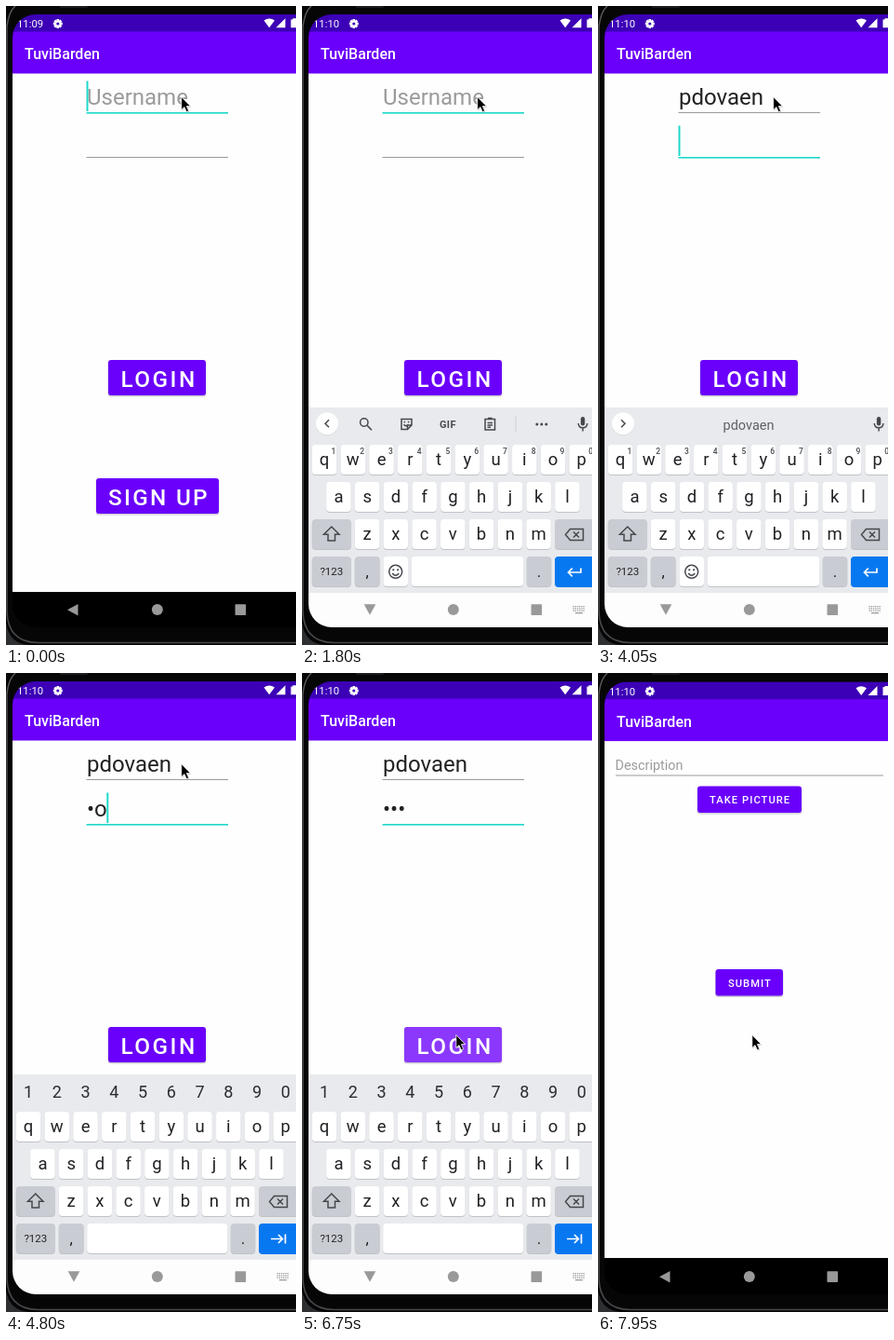
Recreate the animation shown at these times as an HTML page. Size 312 by 686 pixels, loop 8 s.

```html
<!DOCTYPE html>
<html lang="en">
<head>
<meta charset="utf-8">
<title>Login</title>
<style>
  html, body { margin: 0; width: 100%; height: 100%; overflow: hidden; background: #080809; }
  svg { display: block; width: 100%; height: 100%; }
  text { font-family: Roboto, sans-serif; white-space: pre; }
  .mid { text-anchor: middle; }
  .bold { font-weight: 500; }
  .line { fill: none; stroke: #45484d; stroke-width: 1.5; }
</style>
</head>
<body>
<svg id="stage" viewBox="0 0 312 686"></svg>
<script>
const LOOP = 8000, TICK = 150;
const PURPLE = '#6a00fb', TEAL = '#1cd9c9', HINT = '#9b9b9b', INK = '#45484d', BLUE = '#0878f0';
const NAME = 'pdovaen';

const rect = (x, y, w, h, fill, extra = '') =>
  `<rect x="${x}" y="${y}" width="${w}" height="${h}" fill="${fill}" ${extra}/>`;
const text = (x, y, size, fill, str, extra = '') =>
  `<text x="${x}" y="${y}" font-size="${size}" fill="${fill}" ${extra}>${str}</text>`;
const path = (d, extra = 'class="line"') => `<path d="${d}" ${extra}/>`;
const circle = (x, y, r, extra) => `<circle cx="${x}" cy="${y}" r="${r}" ${extra}/>`;
const group = (id, inner, extra = '') => `<g id="${id}" ${extra}>${inner}</g>`;

function button(x, y, w, h, label, tx, ty, size, spacing) {
  return rect(x - .4, y + 1.4, w + .8, h, '#cfcfd5', 'rx="3"') + rect(x, y, w, h, PURPLE, 'rx="3"') +
    text(tx, ty, size, '#fff', label, `class="bold" letter-spacing="${spacing}"`);
}

function key(x, y, w, fill = '#fff', label = '', size = 18.5, shadow = '#bfc2c7') {
  return rect(x, y + 1, w, 32, shadow, 'rx="4"') + rect(x, y, w, 32, fill, 'rx="4"') +
    text(x + w / 2, y + 16 + size * .33, size, '#202124', label, 'class="mid"');
}

const keyRow = (letters, x, y) =>
  [...letters].map((c, i) => key(x + i * 30.75, y, 26.5, '#fff', c)).join('');
const digitRow = (y, dx, size, fill, cls = 'mid') =>
  [...'1234567890'].map((c, i) => text(24 + dx + i * 30.75, y, size, fill, c, `class="${cls}"`)).join('');

function bars() {
  const gear = [0, 1, 2, 3].map(i =>
    `<rect x="-1.3" y="-5" width="2.6" height="10" transform="rotate(${i * 45})"/>`).join('');
  return rect(7, 9, 305, 19, '#3c00b6') + rect(7, 27.5, 305, 45, PURPLE) +
    text(12, 23, 11.3, '#fff', '', 'id="clock"') +
    `<g transform="translate(55.8 19)" fill="#fff">${gear}${circle(0, 0, 3.7, '')}${circle(0, 0, 1.6, 'fill="#3c00b6"')}</g>` +
    path('M277.5 15.6Q283.2 11.5 289 15.6L283.2 23.3Z M300.5 13.3V23.3H290.5Z M306.5 14.5H308.5V13.3H312V23.3H306.5Z', 'fill="#fff"') +
    text(20, 57, 16, '#fff', 'TuviBarden', 'class="bold"');
}

function login() {
  return rect(7, 72, 305, 560, '#fefefe') +
    text(87, 106, 24, HINT, '', 'id="user"') + rect(87, 108.3, 0, 1.3, '#222', 'id="compose"') +
    text(87, 154, 24, '#222', '', 'id="pass"') +
    rect(86.5, 114, 152.5, 1, HINT, 'id="userLine"') + rect(86.5, 162, 152.5, 1, HINT, 'id="passLine"') +
    rect(0, 0, 2, 32.5, TEAL, 'id="caret"') +
    button(110, 380, 105, 38, 'LOGIN', 123.4, 409, 24.3, 2.5) +
    rect(110, 380, 105, 38, '#fff', 'id="ripple" rx="3"') +
    button(97, 507, 132, 38, 'SIGN UP', 110, 536, 24.3, 2.3);
}

function post() {
  return rect(7, 72, 305, 556, '#fefefe') + text(18.5, 104, 14.4, HINT, 'Description') +
    rect(19, 109.5, 288, 1, HINT) +
    button(107, 121.5, 112, 28.5, 'TAKE PICTURE', 120.1, 140, 11.2, 1.04) +
    button(126.5, 318, 72.5, 28.5, 'SUBMIT', 139.9, 336.5, 11.2, 1.04);
}

function nav() {
  let dots = '';
  for (let r = 0; r < 3; r++)
    for (let c = 0; c < 6; c++) dots += rect(291.5 + c * 2.2, 644 + r * 2.3, 1.3, 1.3, '#999');
  return rect(7, 629, 305, 39, '#000', 'id="navBack"') +
    path('M66 648.3L77.5 642V654.6Z', 'id="back" fill="#999"') +
    circle(162.8, 648, 6, 'fill="#999"') + rect(246.5, 642.3, 11.6, 11.8, '#999', 'rx=".8"') +
    group('imeIcon', dots + rect(294, 651, 8, 1.3, '#999'));
}

function tools() {
  return path('M70.2 450.4L75 455.2') + circle(66.8, 447, 4.2, 'class="line"') +
    path('M107 443.5H118V450L113.5 454.5H107ZM118 450H113.5V454.5M109.5 449.3Q111.5 452 114.5 449.3') +
    circle(110.3, 446.6, .9, `fill="${INK}"`) + circle(114.6, 446.6, .9, `fill="${INK}"`) +
    text(157, 452.5, 11, INK, 'GIF', 'class="mid" font-weight="700" letter-spacing=".5"') +
    path('M197 443.5H207.5V455H197ZM199.5 447.5H205M199.5 450H205M199.5 452.3H203M200 442.5H204.5') +
    rect(229.5, 440, 1, 18, '#cdd0d4') +
    [252.8, 257.8, 262.8].map(x => circle(x, 449, 1.5, `fill="${INK}"`)).join('');
}

function keyboard() {
  const grey = '#c9ccd2', word = (id, x) => text(x, 454.5, 14.5, '#5c6066', '', `id="${id}" class="mid"`);
  return rect(7, 431, 305, 199, '#e8eaed') +
    group('strip',
      circle(27, 449, 12, 'fill="#d3d5d9"') + circle(27, 448.3, 12, 'fill="#fff"') +
      path('M29 444.3L25 448.3L29 452.3', 'id="chevron" class="line"') +
      group('tools', tools()) +
      group('words', word('w0', 77) + word('w1', 162) + word('w2', 247) +
        group('dividers', rect(116.5, 439, 1, 19, '#c6c9cd') + rect(207.5, 439, 1, 19, '#c6c9cd'))) +
      rect(299.9, 441, 4.4, 9.5, INK, 'rx="2.2"') +
      path('M297.3 448Q297.5 452.8 302.1 452.8T306.9 448M302.1 453V456.5')) +
    group('digits', digitRow(456, 0, 18, '#2a2c30')) +
    keyRow('qwertyuiop', 10.8, 471) + group('supers', digitRow(480.5, 9.8, 8.5, '#45484d', 'mid bold')) +
    keyRow('asdfghjkl', 26.2, 511) +
    key(10.8, 551, 42, grey) + path('M31.8 559L40 567.3H35.5V574H28V567.3H23.5Z') +
    keyRow('zxcvbnm', 56.8, 551) +
    key(272, 551, 50, grey) + path('M283.5 567.5L288.5 561.5H302.5V573.5H288.5ZM292 564.5L298 570.5M298 564.5L292 570.5') +
    key(10.8, 591, 42, grey, '?123', 11.5) + key(56.8, 591, 26.8, grey, ',', 17) +
    group('emoji', key(87.5, 591, 26.5) + circle(100.7, 607.3, 7, 'class="line"') +
      path('M97.2 609Q100.7 613.5 104.2 609') + circle(98.3, 605.3, 1.1, `fill="${INK}"`) + circle(103.1, 605.3, 1.1, `fill="${INK}"`) +
      key(117.7, 591, 120.5)) +
    group('wideSpace', key(87.2, 591, 151)) +
    key(241.7, 591, 26.5, grey, '.', 17) + key(272, 591, 50, BLUE, '', 0, BLUE) +
    path('', 'id="enter" fill="none" stroke="#fff" stroke-width="1.7"');
}

function body() {
  return rect(0, 0, 312, 686, '#060607') +
    path('M1 22V650Q2 683 34 683.5H312', 'fill="none" stroke="#48494c" stroke-width="1.6"') +
    path('M0 662Q3 684 24 686H0Z', 'fill="#2e2f31"') +
    path('M1 22Q3 6 10 0', 'fill="none" stroke="#5a5b5e" stroke-width="1.4"') +
    rect(58, 0, 30, 2, '#1b1b1d', 'rx="1"');
}

const stage = document.getElementById('stage');
stage.innerHTML =
  '<clipPath id="screen"><rect x="7" y="9" width="340" height="658" rx="25"/></clipPath>' + body() +
  `<g clip-path="url(#screen)">` + group('login', login()) + nav() + group('keyboard', keyboard()) +
  group('post', post()) + group('bars', bars()) +
  group('mouse', path('M.6 1.6V15L3.8 12.2L6.2 17.4L8.8 16.2L6.4 11.2H10.6Z', 'fill="#777" opacity=".35"') +
    path('M0 0V14L3.2 11.1L5.5 16.2L7.9 15.1L5.6 10.1H9.8Z', 'fill="#000" stroke="#fff" stroke-width=".8"')) + '</g>';

const el = {};
stage.querySelectorAll('[id]').forEach(e => el[e.id] = e);
const set = (id, attrs) => { for (const k in attrs) el[id].setAttribute(k, attrs[k]); };
const show = (id, on) => { el[id].style.display = on ? '' : 'none'; };
const write = (id, str) => { if (el[id].textContent !== str) el[id].textContent = str; };

// Value of the latest [time, value] entry reached.
const at = (track, t) => track.reduce((v, [time, next]) => t >= time ? next : v, track[0][1]);

const typed = [[0, 0], [1950, 1], [2100, 2], [2250, 3], [3000, 4], [3300, 6], [3450, 7]];
const secret = [[0, ''], [4500, 'b'], [4800, '•o'], [5100, '••i'], [6600, '•••']];
const caretFlips = [150, 300, 750, 1200, 1800, 1950, 2700, 3000, 5550, 6000, 6600, 7050, 7650];
const mousePath = [[0, [188.7, 97.5]], [5400, [168, 185]], [5550, [108, 330]], [5700, [62.5, 427]],
  [5850, [157.3, 378]], [6000, [161, 382]], [6150, [164, 386]], [6300, [165.8, 388.5]]];
const rippleTrack = [[0, 0], [6750, .22], [6900, .1], [7050, 0]];

function render(now) {
  const t = Math.floor(now / TICK) * TICK;
  const n = at(typed, t), user = NAME.slice(0, n), pass = at(secret, t);
  const onPass = t >= 4050, secure = t >= 4200, done = t >= 3750, posting = t >= 7800;

  write('clock', t < 1800 ? '11:09' : '11:10');
  write('user', user || 'Username');
  set('user', { fill: n ? '#222' : HINT });
  write('pass', pass);
  const userWidth = n ? el.user.getComputedTextLength() : 0;
  set('compose', { width: done ? 0 : userWidth });
  for (const [id, focus] of [['userLine', !onPass], ['passLine', onPass]])
    set(id, { fill: focus ? TEAL : HINT, height: focus ? 1.6 : 1 });
  const passWidth = pass ? el.pass.getComputedTextLength() : 0;
  set('caret', { x: 86.5 + (onPass ? passWidth : userWidth), y: onPass ? 128.5 : 80.5 });
  show('caret', caretFlips.filter(f => f <= t).length % 2 === 0);
  set('ripple', { opacity: at(rippleTrack, t) });

  const open = t >= 750 && !posting;
  show('keyboard', open);
  show('imeIcon', t >= 300 && !posting);
  set('navBack', { fill: open ? '#fdfdfd' : '#000', y: posting ? 628 : 629 });
  const turn = open ? Math.min(1, (t - 750) / 450) : 0;
  set('back', { transform: `translate(${turn} ${-turn * .5}) rotate(${-90 * turn} 72 648.3)` });

  show('strip', !secure);
  show('tools', !n);
  show('words', n);
  show('dividers', !done);
  set('chevron', { transform: n ? 'rotate(180 27 448.3)' : '' });
  write('w0', done ? '' : user);
  write('w1', NAME);
  write('w2', n < 4 ? user.toUpperCase() : '');
  show('digits', secure);
  show('supers', !secure);
  show('emoji', !secure);
  show('wideSpace', secure);
  set('enter', { d: secure ? 'M285 607.5H297M293 603L297.5 607.5L293 612M300.5 602.5V612.5'
    : 'M300 603.5V608H286.5M290.8 603.7L286.5 608L290.8 612.3' });

  show('post', posting);
  set('post', { opacity: t < 7950 ? .6 : 1 });
  set('bars', { transform: posting ? 'translate(0 .6)' : '' });
  set('mouse', { transform: `translate(${at(mousePath, t)})` });
}

function loop() {
  render(performance.now() % LOOP);
  requestAnimationFrame(loop);
}
loop();
</script>
</body>
</html>
```
